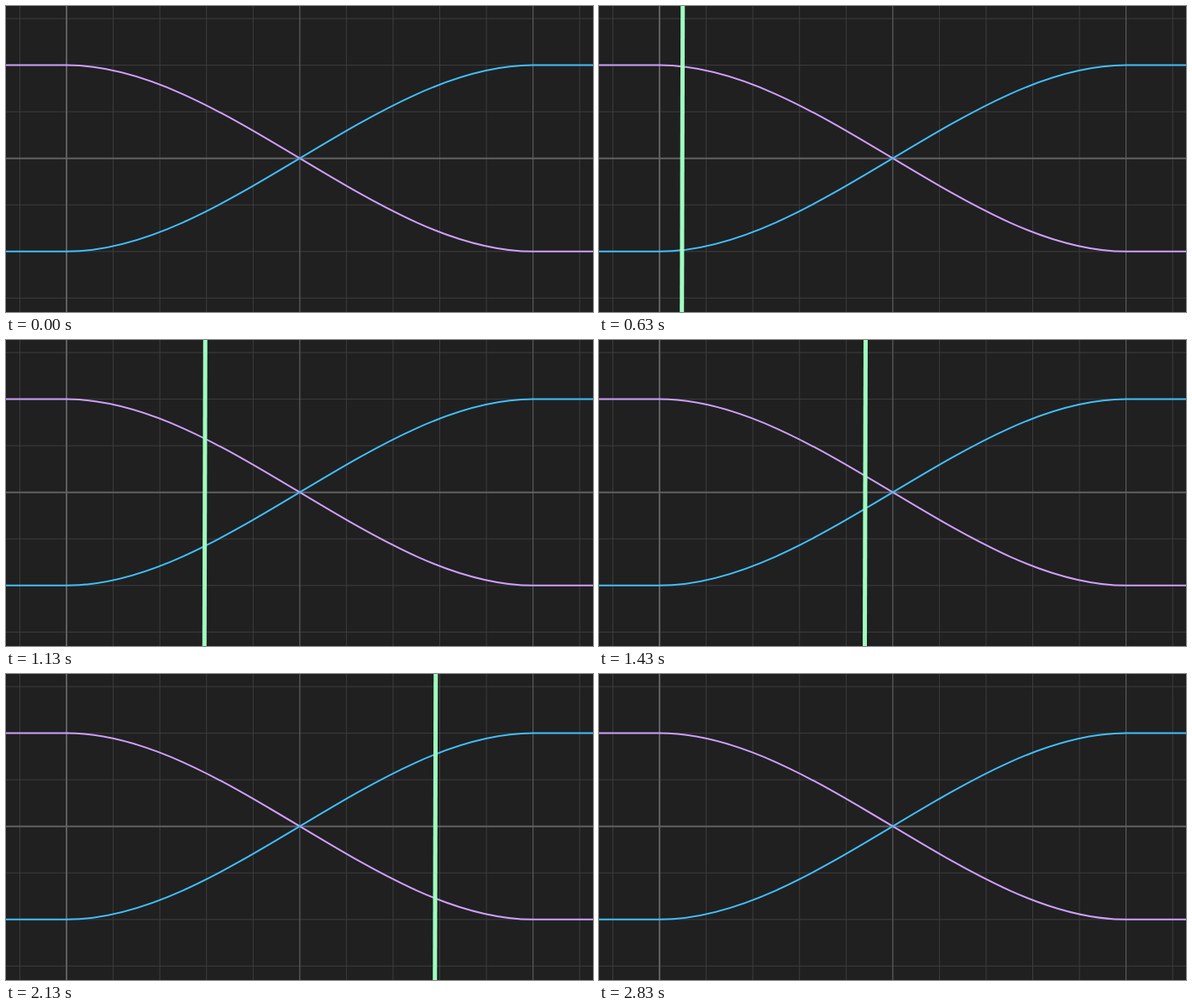
An HTML page for the animation above (3.21 s loop, 699x365 px).

```html
<!DOCTYPE html>
<html lang="en">
<head>
<meta charset="utf-8">
<title>Crossfade curves</title>
<style>
  html, body { margin: 0; width: 100%; height: 100%; overflow: hidden; background: #202020; }
  svg { display: block; width: 699px; height: 365px; }
  path, line { fill: none; }
</style>
</head>
<body>
<svg viewBox="0 0 699 365">
  <path id="minor" stroke="#3d3d3d"/>
  <path id="major" stroke="#606060"/>
  <path id="axes" stroke="#606060" stroke-width="2"/>
  <path id="fall" stroke="#cf9fff" stroke-width="2"/>
  <path id="rise" stroke="#40bfff" stroke-width="2"/>
  <line id="head" x1=".5" y1="0" x2="-.5" y2="365" stroke="#9fffbf" stroke-width="5" visibility="hidden"/>
</svg>
<script>
const LOOP = 3210, CELL = 55.55, X0 = 72.1, Y0 = 181.7;
const FIRST = 8, LAST = 84;
const $ = id => document.getElementById(id);
const setPath = (id, d) => $(id).setAttribute('d', d);
const column = i => `M${X0 + i * CELL} 0V365`;
const row = i => `M0 ${Y0 + i * CELL}H699`;

let grid = '';
for (let i = -1; i <= 11; i++) grid += column(i);
for (let i = -3; i <= 3; i++) grid += row(i);
setPath('minor', grid);
setPath('major', column(5) + column(10));
setPath('axes', column(0) + row(0));

// Smoothstep between two levels is an exact cubic with control points at thirds
function smoothstep(from, to) {
  const w = 10 * CELL;
  return `M0 ${from}H${X0}C${X0 + w / 3} ${from} ${X0 + w * 2 / 3} ${to} ${X0 + w} ${to}H699`;
}
const high = Y0 - 2 * CELL, low = Y0 + 2 * CELL;
setPath('fall', smoothstep(high, low));
setPath('rise', smoothstep(low, high));

// [tick, x] of the playhead, at 30 ticks per second
const keys = [[8, -2], [23, 136], [25, 159], [39, 280], [55, 428], [71, 576], [84, 691]];

function headX(tick) {
  const i = keys.findIndex(k => k[0] >= tick);
  if (i < 1) return keys[0][1];
  const [a, xa] = keys[i - 1], [b, xb] = keys[i];
  return xa + (xb - xa) * (tick - a) / (b - a);
}

function draw(t) {
  const tick = Math.floor((Math.floor(t / 10) * 10 + 4) * 0.03);
  const on = tick >= FIRST && tick <= LAST;
  $('head').setAttribute('visibility', on ? 'visible' : 'hidden');
  if (on) $('head').setAttribute('transform', `translate(${headX(tick)})`);
}

const begin = performance.now();
function loop() {
  draw((performance.now() - begin) % LOOP);
  requestAnimationFrame(loop);
}
loop();
</script>
</body>
</html>
```
